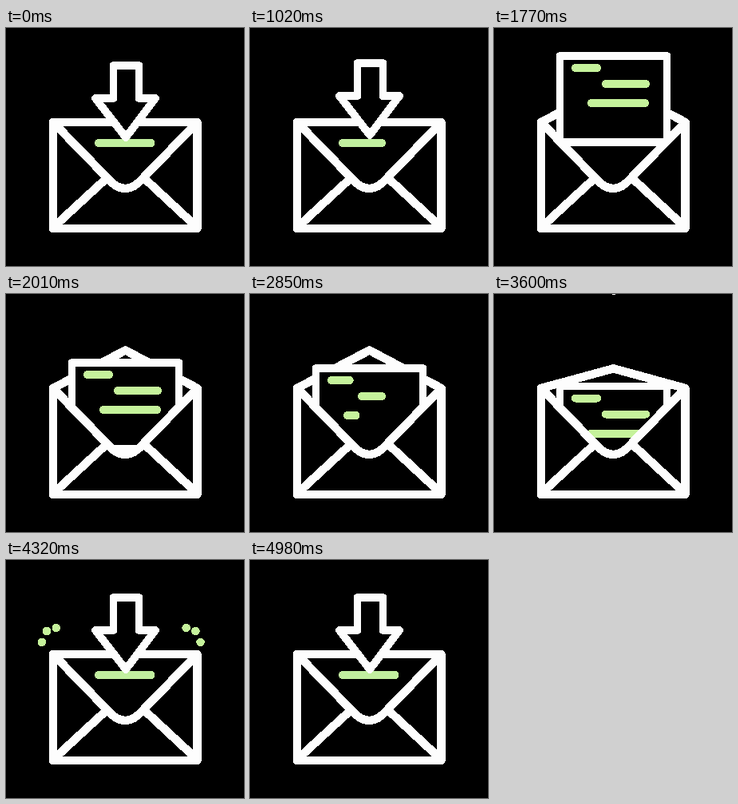
These frames come from a looping animation (298 by 298 pixels, 5.31 s). An HTML page:

```html
<!DOCTYPE html>
<html lang="en">
<head>
<meta charset="utf-8">
<title>Incoming mail</title>
<style>
  html, body { margin: 0; width: 100%; height: 100%; overflow: hidden; background: #000; }
  svg { display: block; width: 100vw; height: 100vh; shape-rendering: crispEdges; }
  .ink { fill: none; stroke: #fdfdfd; stroke-width: 10.5; stroke-linecap: round; stroke-linejoin: round; }
  .solid { fill: #000; stroke-width: 9.8; }
  .green { stroke: #c5f29b; stroke-width: 10; stroke-linecap: round; }
  #mark { stroke: #c1ef9f; }
  circle { fill: #c5f29b; }
</style>
</head>
<body>
<svg viewBox="0 0 298 298">
  <clipPath id="pocket">
    <path d="M0-300H298V118H239.5L171.500 188Q149 214 127 188L59 118H0Z"/>
  </clipPath>
  <path id="flap" class="ink"/>
  <g clip-path="url(#pocket)">
    <g id="letter">
      <rect class="ink solid" x="82.500" y="93" width="134" height="108"/>
      <g id="text"></g>
    </g>
  </g>
  <line id="mark" class="green" y1="144" y2="144"/>
  <path class="ink" d="M59 118V251H239.500V118M59 118L127 188Q149 214 171.500 188L239.500 118M125 189L61 248M174 189L237.500 248"/>
  <path id="arrow" class="ink solid" d="M134.500 47H166.500V88H187L150 137L112 88H134.500Z"/>
  <g id="dots"></g>
</svg>
<script>
const LOOP = 5310, STEP = 30;
const $ = id => document.getElementById(id);
const add = (parent, tag, attrs) => {
  const el = document.createElementNS("http://www.w3.org/2000/svg", tag);
  for (const key in attrs) el.setAttribute(key, attrs[key]);
  return parent.appendChild(el);
};

const progress = (t, start, duration) => Math.min(1, Math.max(0, (t - start) / duration));
const smooth = u => u * u * (3 - 2 * u);
const eased = (t, start, duration) => smooth(progress(t, start, duration));

const rows = [[102, 129, 108], [140, 190, 128], [122, 189, 152]].map(([x1, x2, y]) => ({
  x1, x2, el: add($("text"), "line", { class: "green", y1: y, y2: y })
}));

// Two mirrored bursts of three dots around the upper corners.
const dots = [-1, 1].flatMap(side => [178, 230, 272].map(degrees => ({
  side, angle: degrees * Math.PI / 180, el: add($("dots"), "circle", {})
})));

function trim(el, x1, x2, amount) {
  el.setAttribute("x1", x1);
  el.setAttribute("x2", x1 + (x2 - x1) * amount);
  el.style.display = amount > 0 ? "" : "none";
}

const shift = (el, y) => el.setAttribute("transform", `translate(0 ${y})`);

function arrowY(t) {
  return t < 2500 ? -150 * progress(t, 980, 285) ** 2
                  : -144.5 * (1 - eased(t, 3540, 630));
}

function letterY(t) {
  return -206 * (1 - progress(t, 1380, 720)) ** 1.626 + 120 * eased(t, 3420, 650);
}

function draw(t) {
  const open = eased(t, 1080, 420) - eased(t, 3410, 390);
  $("flap").setAttribute("d", `M59 118L149.5 ${118 - 47.5 * open}L239.5 118`);

  shift($("arrow"), arrowY(t));
  shift($("letter"), letterY(t));
  $("letter").style.display = t > 1380 && t < 4070 ? "" : "none";

  rows.forEach(({ el, x1, x2 }, i) => {
    const erased = eased(t, 2085 + 90 * i, 330);
    const written = eased(t, 2580 + 90 * i, 360);
    trim(el, x1, x2, 1 - erased + written);
  });

  trim($("mark"), 116, 181.5, 1 - progress(t, 990, 120) + eased(t, 4110, 180));

  const reach = 16 + 20 * eased(t, 4230, 570);
  const size = 5.3 * progress(t, 4230, 60) * (1 - eased(t, 4770, 210));
  for (const { el, side, angle } of dots) {
    el.setAttribute("cx", 144.2 + side * (82 - reach * Math.cos(angle)));
    el.setAttribute("cy", 102.3 + reach * Math.sin(angle));
    el.setAttribute("r", size);
  }
}

const origin = performance.now();
function tick() {
  const t = (performance.now() - origin) % LOOP;
  draw(Math.floor(t / STEP) * STEP);
  requestAnimationFrame(tick);
}
tick();
</script>
</body>
</html>
```
